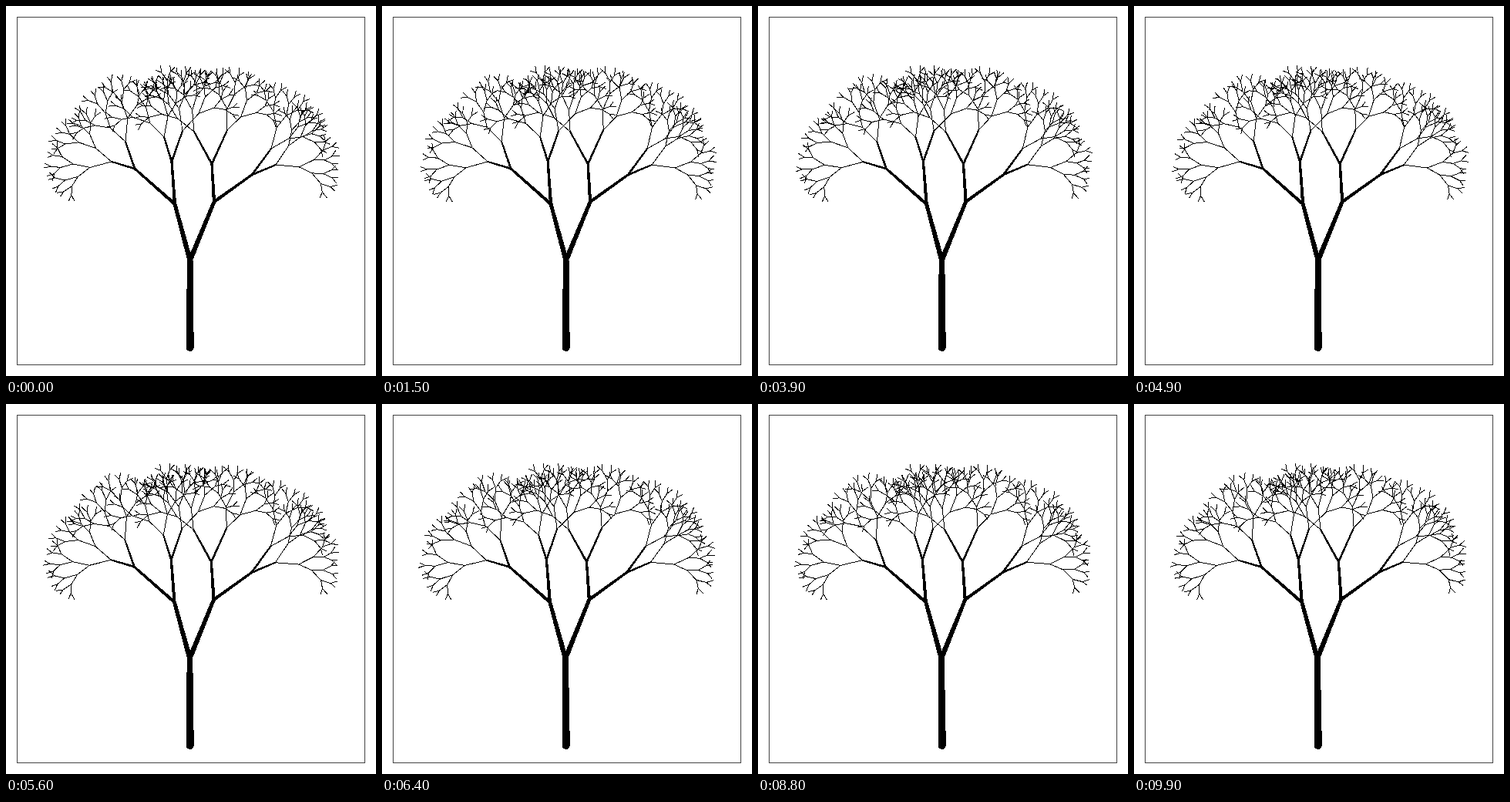
Write an HTML page that moves like this. It is 480 px wide and 480 px high and loops after 10000 ms.

```html
<!DOCTYPE html>
<html>
<head>
<meta charset="utf-8">
<style>
html, body { margin: 0; width: 100%; height: 100%; overflow: hidden; background: #fff; }
svg { display: block; width: 480px; height: 480px; }
</style>
</head>
<body>
<svg viewBox="0 0 480 480" fill="none" stroke="#000" shape-rendering="crispEdges">
  <rect x="14.5" y="14.5" width="451" height="451" stroke="#444"/>
  <g id="tree"></g>
</svg>
<script>
const tree = document.getElementById('tree');
const LOOP = 10000, STEP = 100, RAD = Math.PI / 180;
const BASE = [238.7, 443], TIP_DEPTH = 8;

// Forks of the main limbs in heap order: fork i carries 2i and 2i + 1.
const forks = [
  [238.7, 330],
  [219, 257], [270, 254],
  [167, 211], [215, 202], [267, 205], [319, 219],
  [137, 202], [155, 176], [205, 170], [229, 162],
  [244, 163], [287, 161], [344, 185], [350, 206]
];

const mix = (a, b, k) => a + (b - a) * k;
const rnd = i => { const v = Math.sin(i * 12.9898) * 43758.5453; return v - Math.floor(v); };
const between = (lo, hi, seed) => mix(lo, hi, rnd(seed));
const line = (a, b) => `M${a.map(n => n.toFixed(2))}L${b.map(n => n.toFixed(2))}`;

function draw(t) {
  const phase = t / STEP * 31.5 * RAD;
  let thick = '', thin = '';

  // Main limbs taper along their length; twigs are one pixel wide.
  function limb(from, to, depth) {
    if (depth > 3) {
      thin += line(from, to);
      return;
    }
    const at = k => from.map((n, axis) => mix(n, to[axis], k));
    const width = 10 * 0.65 ** depth, parts = 6;
    for (let k = 0; k < parts; k++) {
      thick += `<path d="${line(at(k / parts), at((k + 1) / parts))}"
        stroke-width="${width * (1 - 0.28 * k / parts)}"/>`;
    }
  }

  function twig(i, from, heading, depth) {
    const side = i % 2 ? 1 : -1;
    const flutter = 1.5 * Math.sin(phase + i);
    const angle = heading + (side * between(20, 32, i) + flutter) * RAD;
    const length = 28 * 0.75 ** (depth - 4) * between(0.87, 1.13, i + 0.5);
    return [from[0] + length * Math.cos(angle), from[1] + length * Math.sin(angle)];
  }

  function grow(i, from, heading, depth) {
    if (depth > TIP_DEPTH) return;
    const to = forks[i - 1] || twig(i, from, heading, depth);
    const next = Math.atan2(to[1] - from[1], to[0] - from[0]);
    limb(from, to, depth);
    grow(2 * i, to, next, depth + 1);
    grow(2 * i + 1, to, next, depth + 1);
  }

  grow(1, BASE, 0, 0);
  const sway = 0.26 * (Math.sin(phase + 30 * RAD) - 0.5);
  tree.setAttribute('transform', `rotate(${sway} ${BASE})`);
  tree.innerHTML = `<g stroke-linecap="round">${thick}</g><path d="${thin}"/>`;
}

let shown = -1;
function tick() {
  const t = Math.floor(performance.now() % LOOP / STEP) * STEP;
  if (t !== shown) draw(shown = t);
  requestAnimationFrame(tick);
}
tick();
</script>
</body>
</html>
```
